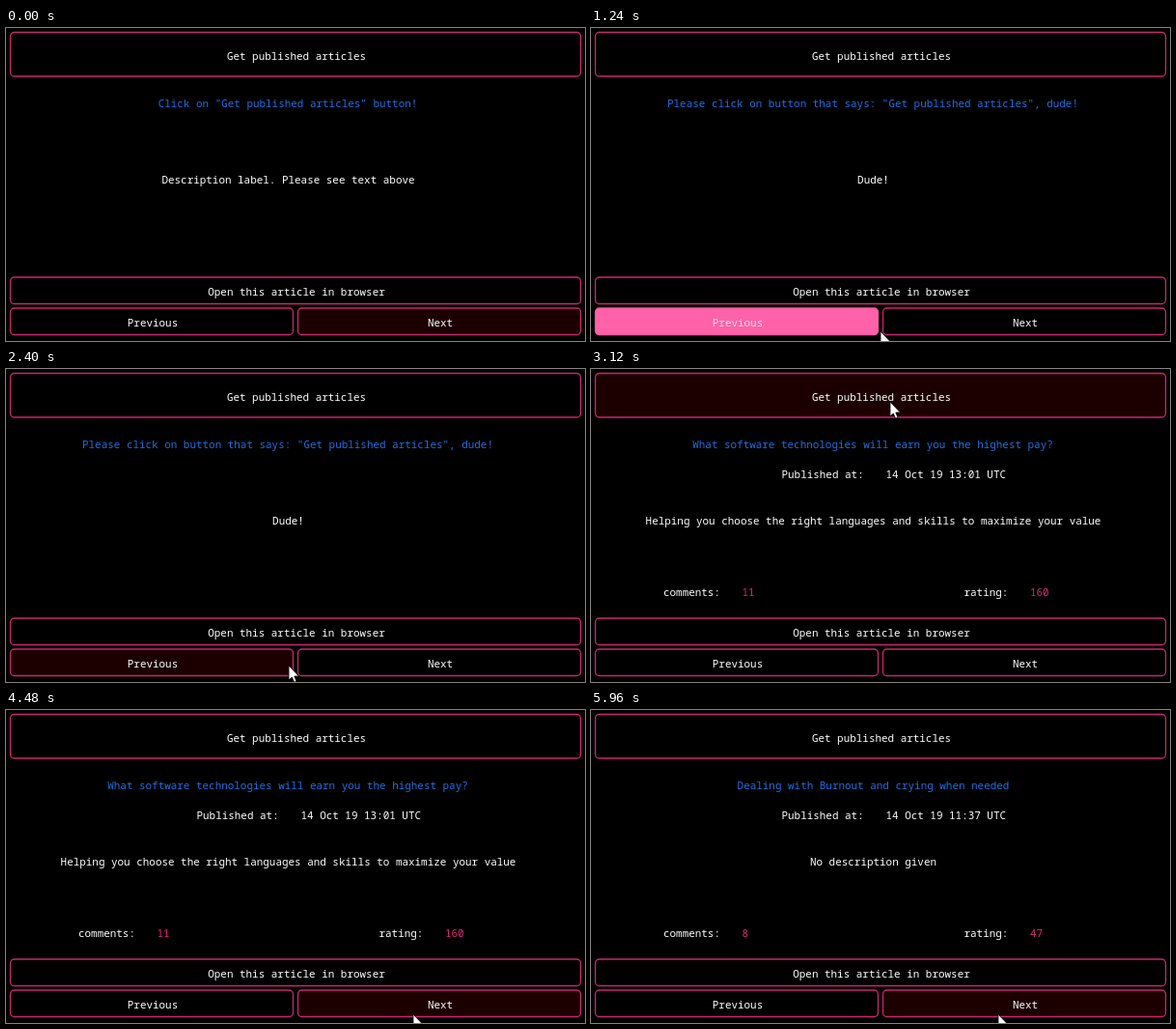
Recreate the animation shown at these times as an HTML page. Size 600 by 324 pixels, loop 6000 ms.

```html
<!DOCTYPE html>
<html lang="en">
<head>
<meta charset="utf-8">
<title>Article reader</title>
<style>
html, body { margin: 0; width: 100%; height: 100%; overflow: hidden; background: #000; }
svg { display: block; width: 600px; height: 324px; font: 10.93px "Noto Sans Mono", "DejaVu Sans Mono", monospace; }
text { fill: #fff; white-space: pre; }
.mid { text-anchor: middle; }
.title { fill: #1f6fe0; }
.num { fill: #dc2878; }

.button { fill: #000; stroke: #c8286f; stroke-width: 1.3; color: #fff; }
.button text { fill: currentColor; stroke: none; text-anchor: middle; }

.button, .scene, .meta, #cursor { animation: 6s infinite step-end; }
#get { animation-name: get; }
#prev { animation-name: prev; }
#next { animation-name: next; }
.scene, .meta { visibility: hidden; }
#intro { animation-name: intro; }
#ask { animation-name: ask; }
#dude { animation-name: dude; }
#pay { animation-name: pay; }
#express { animation-name: express; }
#burnout { animation-name: burnout; }
.meta { animation-name: meta; }
#cursor { animation-name: move; animation-timing-function: ease-in-out; }

/* idle: black, hover: dark red, pressed: pink */
@keyframes get {
  0%, 53%, 100% { fill: #000; stroke: #c8286f; color: #fff; }
  45%, 50% { fill: #1c0000; stroke: #c8286f; color: #fff; }
  46.5% { fill: #ff62a8; stroke: #f65aa0; color: #ffdcec; }
}
@keyframes prev {
  0%, 23%, 43%, 100% { fill: #000; stroke: #c8286f; color: #fff; }
  16%, 21%, 35%, 39% { fill: #1c0000; stroke: #c8286f; color: #fff; }
  18%, 36% { fill: #ff62a8; stroke: #f65aa0; color: #ffdcec; }
}
@keyframes next {
  16%, 34% { fill: #000; stroke: #c8286f; color: #fff; }
  0%, 11%, 28%, 33%, 57%, 86%, 98%, 100% { fill: #1c0000; stroke: #c8286f; color: #fff; }
  8%, 30%, 82%, 95% { fill: #ff62a8; stroke: #f65aa0; color: #ffdcec; }
}

@keyframes intro { 0% { visibility: visible; } 8%, 100% { visibility: hidden; } }
@keyframes ask { 0%, 18%, 36%, 100% { visibility: hidden; } 8%, 30% { visibility: visible; } }
@keyframes dude { 0%, 30%, 51%, 100% { visibility: hidden; } 18%, 36% { visibility: visible; } }
@keyframes pay { 0%, 82%, 100% { visibility: hidden; } 51% { visibility: visible; } }
@keyframes express { 0%, 95%, 100% { visibility: hidden; } 82% { visibility: visible; } }
@keyframes burnout { 0% { visibility: hidden; } 95%, 100% { visibility: visible; } }
@keyframes meta { 0% { visibility: hidden; } 51%, 100% { visibility: visible; } }

@keyframes move {
  0% { transform: translate(370px, 326px); }
  4%, 12% { transform: translate(340px, 308px); }
  17%, 19% { transform: translate(292px, 311px); }
  20.667% { transform: translate(300px, 314px); }
  29%, 33% { transform: translate(336px, 303px); }
  35.5%, 41% { transform: translate(293px, 307px); }
  46%, 52% { transform: translate(310px, 34px); }
  59%, 100% { transform: translate(422px, 315px); }
}
</style>
</head>
<body>
<svg viewBox="0 0 600 324">
  <rect width="600" height="324"/>

  <g class="button" id="get">
    <rect x="4.5" y="4.5" width="591" height="45.5" rx="4"/>
    <text x="301" y="33">Get published articles</text>
  </g>
  <g class="button">
    <rect x="4.5" y="258" width="591" height="27.5" rx="4"/>
    <text x="301" y="277">Open this article in browser</text>
  </g>
  <g class="button" id="prev">
    <rect x="4.5" y="290" width="293" height="27.5" rx="4"/>
    <text x="152" y="309">Previous</text>
  </g>
  <g class="button" id="next">
    <rect x="302.5" y="290" width="293" height="27.5" rx="4"/>
    <text x="450" y="309">Next</text>
  </g>

  <g class="meta">
    <text x="197.5" y="113">Published at:</text>
    <text x="75" y="235">comments:</text>
    <text x="386.5" y="235">rating:</text>
  </g>

  <g class="scene" id="intro">
    <text class="mid title" x="292" y="82">Click on "Get published articles" button!</text>
    <text class="mid" x="292.5" y="161">Description label. Please see text above</text>
  </g>
  <g class="scene" id="ask">
    <text class="mid title" x="292" y="82">Please click on button that says: "Get published articles".</text>
    <text class="mid" x="292.5" y="161">Dude.</text>
  </g>
  <g class="scene" id="dude">
    <text class="mid title" x="292" y="82">Please click on button that says: "Get published articles", dude!</text>
    <text class="mid" x="292.5" y="161">Dude!</text>
  </g>
  <g class="scene" id="pay">
    <text class="mid title" x="292" y="82">What software technologies will earn you the highest pay?</text>
    <text x="305.5" y="113">14 Oct 19 13:01 UTC</text>
    <text class="mid" x="292.5" y="161">Helping you choose the right languages and skills to maximize your value</text>
    <text class="num" x="156.5" y="235">11</text>
    <text class="num" x="455" y="235">160</text>
  </g>
  <g class="scene" id="express">
    <text class="mid title" x="292.5" y="82">[Express] React as a View Template Engine?</text>
    <text x="305.5" y="113">14 Oct 19 07:31 UTC</text>
    <text x="52.5" y="161">It is possible to use React as a view template engine of Express. In this</text>
    <text x="52.5" y="175">article, I'll explain it with a working example repository.</text>
    <text class="num" x="156.5" y="235">7</text>
    <text class="num" x="455" y="235">62</text>
  </g>
  <g class="scene" id="burnout">
    <text class="mid title" x="292.5" y="82">Dealing with Burnout and crying when needed</text>
    <text x="305.5" y="113">14 Oct 19 11:37 UTC</text>
    <text class="mid" x="292.5" y="161">No description given</text>
    <text class="num" x="156.5" y="235">8</text>
    <text class="num" x="455" y="235">47</text>
  </g>

  <path id="cursor" d="M0 0V15L3.3 12L5.6 17.2L8 16.2L5.8 11H10.5Z" fill="#fff" stroke="#000" stroke-width=".8"/>
</svg>
</body>
</html>
```
